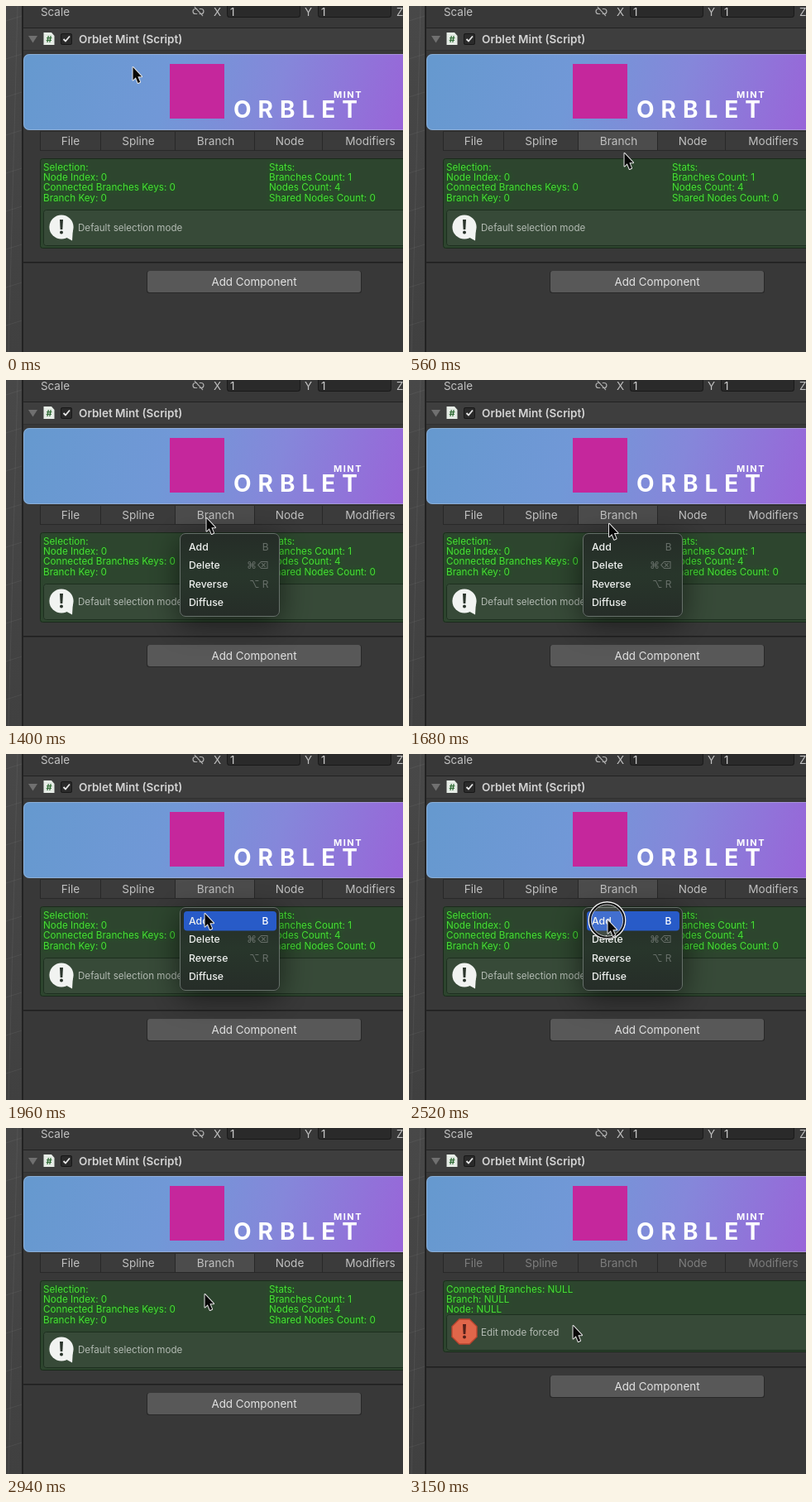
An HTML page with a canvas for the animation above (3.22 s loop, 480x418 px).

```html
<!DOCTYPE html>
<html lang="en">
<head>
<meta charset="utf-8">
<title>Inspector menu</title>
<style>
html, body { margin: 0; width: 100%; height: 100%; overflow: hidden; background: #383838; }
canvas { display: block; width: 480px; height: 418px; }
</style>
</head>
<body>
<canvas id="stage" width="480" height="418"></canvas>
<script>
const ctx = document.getElementById('stage').getContext('2d');
const LOOP = 3220, STEP = 70;
const SANS = 'Inter, "Open Sans", sans-serif';
const SYMBOLS = 'Inter, "DejaVu Sans", sans-serif';

// Moments of the interaction, in ms
const HOVER = 490, PRESS = 840, RELEASE = 1050, MENU_OPEN = 1190;
const PICK = 2380, PICK_END = 2730, MENU_CLOSE = 2870, FORCED = 3080;

// Pointer stops: time, x, y
const PATH = [
  [0, 153, 74], [560, 260, 178], [630, 260, 178], [840, 242, 167],
  [1540, 242, 167], [1960, 240, 193], [2240, 240, 201], [2940, 240, 201], [3150, 198, 239]
];

function box(x, y, w, h, fill, r = 0) {
  ctx.beginPath();
  ctx.roundRect(x, y, w, h, r);
  ctx.fillStyle = fill;
  ctx.fill();
}

function frame(x, y, w, h, color, r = 0) {
  ctx.beginPath();
  ctx.roundRect(x + .5, y + .5, w - 1, h - 1, r);
  ctx.strokeStyle = color;
  ctx.lineWidth = 1;
  ctx.stroke();
}

function line(color, width, ...pts) {
  ctx.beginPath();
  pts.forEach(p => ctx.lineTo(p[0], p[1]));
  ctx.strokeStyle = color;
  ctx.lineWidth = width;
  ctx.stroke();
}

function text(s, x, y, size, color, align = 'left', style = '400', family = SANS) {
  ctx.font = `${style} ${size}px ${family}`;
  ctx.textAlign = align;
  ctx.fillStyle = color;
  ctx.fillText(s, x, y);
}

function polygon(pts, fill) {
  ctx.beginPath();
  pts.forEach(p => ctx.lineTo(p[0], p[1]));
  ctx.closePath();
  ctx.fillStyle = fill;
  ctx.fill();
}

function disc(x, y, r, fill) {
  ctx.beginPath();
  ctx.arc(x, y, r, 0, 7);
  ctx.fillStyle = fill;
  ctx.fill();
}

function pointerAt(t) {
  const i = PATH.findIndex(p => p[0] > t);
  if (i < 0) return PATH[PATH.length - 1].slice(1);
  const [t0, x0, y0] = PATH[i - 1], [t1, x1, y1] = PATH[i];
  const u = (t - t0) / (t1 - t0), e = u * u * (3 - 2 * u);
  return [x0 + (x1 - x0) * e, y0 + (y1 - y0) * e];
}

function drawScene() {
  box(0, 0, 480, 418, '#383838');
  const g = ctx.createLinearGradient(0, 0, 0, 418);
  g.addColorStop(0, '#484848');
  g.addColorStop(1, '#404040');
  box(0, 0, 19, 418, g);
  for (let y = 12; y < 418; y += 46) line('rgba(255,255,255,.06)', 1, [0, y + 6], [19, y]);
  line('rgba(255,255,255,.06)', 1, [14, 0], [3, 418]);
  box(19, 0, 2, 418, '#222222');
}

function drawField(label, x, left, value) {
  text(label, x, 11.5, 13.4, '#c2c2c2');
  box(left, -6, 89, 20, '#2a2a2a', 3);
  frame(left, -6, 89, 20, '#191919', 3);
  text(value, left + 4, 11.5, 13.4, '#d0d0d0');
}

function drawLink() {
  ctx.save();
  ctx.translate(232.5, 6.5);
  ctx.scale(.86, .86);
  ctx.lineCap = 'round';
  ctx.lineWidth = 1.4;
  ctx.strokeStyle = '#b0b0b0';
  ctx.beginPath();
  ctx.moveTo(-2, -3.5);
  ctx.lineTo(-4, -3.5);
  ctx.arc(-4, 0, 3.5, -Math.PI / 2, Math.PI / 2, true);
  ctx.lineTo(-2, 3.5);
  ctx.moveTo(2, -3.5);
  ctx.lineTo(4, -3.5);
  ctx.arc(4, 0, 3.5, -Math.PI / 2, Math.PI / 2);
  ctx.lineTo(2, 3.5);
  ctx.moveTo(-5, -6);
  ctx.lineTo(6, 6);
  ctx.stroke();
  ctx.restore();
}

function drawHeader() {
  text('Scale', 42, 11.5, 13.4, '#c2c2c2');
  drawLink();
  drawField('X', 251, 267, '1');
  drawField('Y', 361, 377, '1');
  text('Z', 472, 11.5, 13.4, '#c2c2c2');

  box(21, 26, 459, 28, '#3e3e3e');
  box(21, 26, 459, 1, '#222222');
  box(21, 53, 459, 1, '#303030');
  polygon([[27, 36], [38, 36], [32.5, 44.5]], '#707070');
  polygon([[45.5, 32], [55, 32], [58.5, 36], [58.5, 47], [45.5, 47]], '#e6ece6');
  text('#', 52, 44, 11, '#2f6b35', 'center', '700');
  box(66, 33, 14, 14, '#2a2a2a', 2);
  frame(66, 33, 14, 14, '#171717', 2);
  line('#e8e8e8', 1.8, [69.5, 40], [72, 42.5], [77, 36.5]);
  text('Orblet Mint (Script)', 88, 45, 13.5, '#d4d4d4', 'left', '600');
}

function drawBanner() {
  const g = ctx.createLinearGradient(40, 30, 500, 170);
  g.addColorStop(0, '#6699cf');
  g.addColorStop(.35, '#7198d7');
  g.addColorStop(.62, '#8587da');
  g.addColorStop(1, '#9c5fd8');
  box(21, 58, 470, 92, g, 7);
  frame(21, 58, 470, 92, 'rgba(205,215,225,.35)', 7);
  box(198, 70, 66, 66, '#c5279c');
  ctx.letterSpacing = '8px';
  text('ORBLET', 275, 135, 28, '#ffffff', 'left', '700');
  ctx.letterSpacing = '1.5px';
  text('MINT', 396, 111, 11, '#ffffff', 'left', '700');
  ctx.letterSpacing = '0px';
}

function drawTabs(hover, disabled) {
  const tabs = [['File', 41, 78], ['Spline', 114, 160], ['Branch', 204, 253.5], ['Node', 300, 343], ['Modifiers', 382, 440.5]];
  box(41, 152, 439, 23, '#3b3b3b');
  if (hover) box(205, 152, 96, 23, '#4c4c4c');
  box(41, 151, 439, 1, '#2c2c2c');
  box(41, 174, 439, 1, '#292929');
  for (const [name, left, mid] of tabs) {
    box(left, 152, 1, 23, '#282828');
    text(name, mid, 168, 13.6, disabled ? '#7c7c7c' : '#c0c0c0', 'center');
  }
}

function column(rows, x) {
  ctx.save();
  ctx.shadowColor = 'rgb(0,110,0)';
  ctx.shadowBlur = 5;
  rows.forEach((s, i) => text(s, x, 198.5 + i * 12.4, 11.7, '#48e035'));
  ctx.restore();
}

function mark(x, y, color) {
  polygon([[x - 2, y - 9], [x + 2, y - 9], [x + 1.3, y + 3], [x - 1.3, y + 3]], color);
  disc(x, y + 6.5, 2, color);
}

function drawBubble(x, y) {
  polygon([[x + 1, y + 10], [x + 14, y + 2], [x + 13, y + 16.5]], '#f1f3f1');
  disc(x, y, 14.6, '#f1f3f1');
  mark(x, y, '#2b352c');
}

function drawStop(x, y) {
  const ring = r => Array.from({ length: 8 }, (_, i) => {
    const a = (i + .5) * Math.PI / 4;
    return [x + r * Math.cos(a), y + r * Math.sin(a)];
  });
  polygon(ring(17), '#b9442f');
  polygon(ring(15.5), '#e0664a');
  mark(x, y, '#54201a');
}

function drawPanel(forced) {
  const bottom = forced ? 271 : 293, top = forced ? 225 : 246;
  box(41, 184, 450, bottom - 184, '#2d452e', 3);
  frame(41, 184, 450, bottom - 184, '#1a2a1b', 3);
  box(45, top, 450, 44, '#374a38', 3);
  frame(45, top, 450, 44, '#1d2f1f', 3);
  if (forced) {
    column(['Connected Branches: NULL', 'Branch: NULL', 'Node: NULL'], 45);
    drawStop(67, 246);
    text('Edit mode forced', 87, 250.5, 11.7, '#b3bbb3');
  } else {
    column(['Selection:', 'Node Index: 0', 'Connected Branches Keys: 0', 'Branch Key: 0'], 45);
    column(['Stats:', 'Branches Count: 1', 'Nodes Count: 4', 'Shared Nodes Count: 0'], 318);
    drawBubble(67, 267);
    text('Default selection mode', 87, 272, 11.6, '#b3bbb3');
  }
}

function drawFooter(dy) {
  box(21, 309 + dy, 459, 1, '#1f1f1f');
  box(21, 310 + dy, 459, 1, '#2b2b2b');
  box(170, 320 + dy, 260, 27, '#282828', 3);
  box(171, 320 + dy, 258, 26, '#585858', 3);
  text('Add Component', 300, 338 + dy, 13.4, '#e2e2e2', 'center');
}

function drawMenu(active) {
  ctx.save();
  ctx.shadowColor = 'rgba(0,0,0,.55)';
  ctx.shadowBlur = 36;
  ctx.shadowOffsetY = 8;
  box(210, 185, 121, 101, '#272f29', 7);
  ctx.restore();
  const g = ctx.createLinearGradient(0, 185, 0, 286);
  g.addColorStop(0, '#252c27');
  g.addColorStop(.5, '#28362b');
  g.addColorStop(1, '#262d28');
  box(210, 185, 121, 101, g, 7);
  frame(210, 185, 121, 101, '#66706a', 6.5);
  if (active) box(215, 190, 112, 23.5, '#285bc8', 4);
  [['Add', 'B'], ['Delete', '⌘⌫'], ['Reverse', '⌥ R'], ['Diffuse', '']].forEach(([name, key], i) => {
    const y = 205.7 + i * 22.5, lit = active && i === 0;
    text(name, 221, y, 12.3, '#eef0ee', 'left', '500');
    text(key, 317.5, y, 12, lit ? '#ffffff' : '#68706a', 'right', lit ? '500' : '400', SYMBOLS);
  });
}

function drawPress(x, y) {
  disc(x, y, 22, 'rgba(255,255,255,.12)');
  for (const [r, color, w] of [[21, 'rgba(0,0,0,.85)', 4], [22.3, '#f2f2f2', 1.4], [19.2, 'rgba(240,240,240,.75)', 1]]) {
    ctx.beginPath();
    ctx.arc(x, y, r, 0, 7);
    ctx.strokeStyle = color;
    ctx.lineWidth = w;
    ctx.stroke();
  }
}

function drawPointer(x, y) {
  ctx.save();
  ctx.translate(x + .5, y);
  ctx.scale(.88, .94);
  ctx.beginPath();
  [[0, 0], [0, 16.5], [3.8, 13], [7, 20.2], [9.8, 19], [6.7, 12], [12, 12]].forEach(p => ctx.lineTo(...p));
  ctx.closePath();
  ctx.lineJoin = 'round';
  ctx.strokeStyle = '#e8e8e8';
  ctx.lineWidth = 2.2;
  ctx.stroke();
  ctx.fillStyle = '#080808';
  ctx.fill();
  ctx.restore();
}

function draw(t) {
  const [x, y] = pointerAt(t);
  const forced = t >= FORCED;
  drawScene();
  drawHeader();
  drawBanner();
  drawTabs(t >= HOVER && !forced, forced);
  drawPanel(forced);
  drawFooter(forced ? -21 : 0);
  if (t >= MENU_OPEN && t < MENU_CLOSE) drawMenu(y >= 189);
  if ((t >= PRESS && t < RELEASE) || (t >= PICK && t < PICK_END)) drawPress(x - .5, y);
  drawPointer(x, y);
}

const start = performance.now();
function tick(now) {
  const t = Math.max(0, now - start) % LOOP;
  draw(Math.floor(t / STEP) * STEP);
  requestAnimationFrame(tick);
}
draw(0);
requestAnimationFrame(tick);
</script>
</body>
</html>
```
